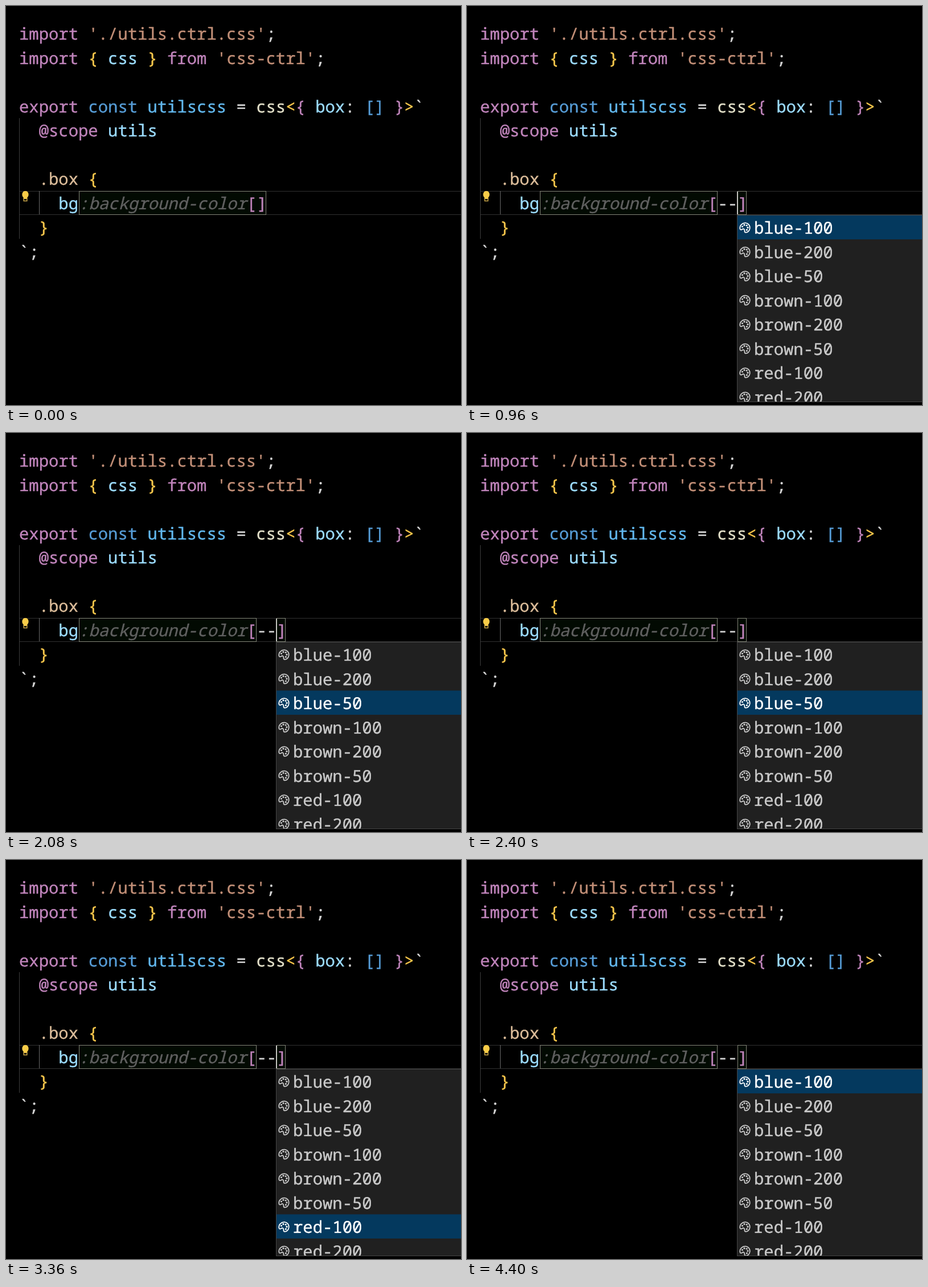
Write an HTML page that moves like this. It is 799 px wide and 701 px high and loops after 4.48 s.

```html
<!DOCTYPE html>
<html lang="en">
<head>
<meta charset="utf-8">
<title>Editor completion</title>
<style>
  html, body { margin: 0; width: 100%; height: 100%; overflow: hidden; background: #000; }
  svg { display: block; width: 799px; height: 701px; }
  text {
    font: 28.9px "Noto Sans Mono", "DejaVu Sans Mono", monospace;
    text-rendering: geometricPrecision;
    white-space: pre;
    fill: currentColor;
    stroke: currentColor;
    stroke-width: .4px;
  }
  .hint { font-style: italic; }
  .item { color: #cacaca; }
  .item.on { color: #fff; }
</style>
</head>
<body>
<svg id="stage" viewBox="0 0 799 701">
  <defs>
    <clipPath id="view"><rect x="475" y="368" width="324" height="327"/></clipPath>
    <g id="palette">
      <path d="M-8.5 2.2C-9.8-4-4.5-8.6 1-8.3C6-8 9.2-3.8 8.7 1C8.3 5.6 4.6 8.6 1.2 8.3C-.9 8-.5 6-.7 4.4C-1 2.1-2.6 1.5-4.2 2.5C-5.8 3.6-7.9 4.4-8.5 2.2Z"
        fill="none" stroke="currentColor" stroke-width="1.8"/>
      <g fill="currentColor">
        <circle cx="-4.5" cy="-2" r="1.6"/><circle cx="-1" cy="-4.8" r="1.6"/>
        <circle cx="3.2" cy="-4" r="1.6"/><circle cx="5" cy="-.2" r="1.6"/>
        <circle cx="3.4" cy="3.8" r="1.6"/>
      </g>
    </g>
  </defs>
  <g id="frame">
    <path d="M24 325.5H799M24 366.5H799" stroke="#303030"/>
    <path d="M23.5 197V409" stroke="#3c3c3c"/>
    <path d="M58.5 325V366" stroke="#686868"/>
    <g id="bulb" transform="translate(0 -1)">
      <path d="M30.6 337.5C26.6 334 28 326 34 326S41.4 334 37.4 337.5V340H30.6Z" fill="#f8cc48"/>
      <path d="M31.2 339V343.6H36.8V339" fill="none" stroke="#c9a649" stroke-width="1.5"/>
    </g>
  </g>
  <g id="boxes" fill="#020a02" stroke="#85857a">
    <rect id="hintBox" x="128.5" y="325.5" height="41"/>
    <rect id="endBox" y="325.5" width="15" height="41"/>
  </g>
  <g id="code"></g>
  <rect id="caret" y="326" width="2" height="40" fill="#c4c4c0"/>
  <g id="menu">
    <rect x="474.5" y="367.5" width="340" height="328" fill="#202020" stroke="#454545"/>
    <g clip-path="url(#view)">
      <g id="list"><rect id="bar" x="475" width="324" height="42.5" fill="#04395e"/></g>
    </g>
  </g>
</svg>
<script>
const LOOP = 4480, LEFT = 23, PITCH = 17.34, ROW = 42.5, BASE = 59;
const MENU_TOP = 367.5, MENU_HEIGHT = 327.5;

const color = {
  key: '#c084bb', str: '#c28f77', gold: '#fac84c', name: '#9cdcfe', kind: '#569cd6',
  def: '#62b8ee', plain: '#d4d4d4', call: '#e2dfc8', sel: '#dcbd9a', hint: '#606060'
};

const lines = {
  0: [['key', 'import '], ['str', "'./utils.ctrl.css'"], ['plain', ';']],
  1: [['key', 'import '], ['gold', '{ '], ['name', 'css '], ['gold', '} '], ['key', 'from '],
      ['str', "'css-ctrl'"], ['plain', ';']],
  3: [['key', 'export '], ['kind', 'const '], ['def', 'utilscss '], ['plain', '= '], ['call', 'css'],
      ['gold', '<'], ['key', '{ '], ['name', 'box'], ['plain', ': '], ['kind', '[] '],
      ['key', '}'], ['gold', '>'], ['plain', '`']],
  4: [['key', '  @scope '], ['name', 'utils']],
  6: [['sel', '  .box '], ['gold', '{']],
  7: [['name', '    bg']],
  8: [['gold', '  }']],
  9: [['plain', '`;']]
};

const items = ['blue', 'brown', 'red'].flatMap(c => [100, 200, 50].map(n => `${c}-${n}`));

// Step tables: [start time, value]
const typed = [[0, ''], [720, '-'], [960, '--']];
const picks = [[0, -1], [960, 0], [1680, 1], [2080, 2], [2480, 3], [2720, 4], [3040, 5],
               [3360, 6], [3600, 7], [3920, 8], [4240, 0]];
const blinks = [[0, 0], [80, 1], [640, 0], [720, 1], [1440, 0], [1920, 1], [2400, 0],
                [2880, 1], [3440, 0], [3920, 1], [4400, 0]];

const $ = id => document.getElementById(id);
const at = (table, t) => table.findLast(step => step[0] <= t)[1];

function add(parent, tag, attrs, content = '') {
  const node = document.createElementNS('http://www.w3.org/2000/svg', tag);
  for (const k in attrs) node.setAttribute(k, attrs[k]);
  node.textContent = content;
  return parent.appendChild(node);
}

function write(x, row, kind, content) {
  return add($('code'), 'text',
    { x, y: BASE + row * ROW, color: color[kind], class: kind }, content);
}

for (const row in lines) {
  let col = 0;
  for (const [kind, token] of lines[row]) {
    const indent = token.length - token.trimStart().length;
    write(LEFT + (col + indent) * PITCH, row, kind, token.trim());
    col += token.length;
  }
}

// The hint sits inside the bracket box and shifts the rest of its line.
const hintX = LEFT + 6 * PITCH + 0.8;
const openX = hintX + 17 * PITCH;
const innerX = 440.5;
write(hintX, 7, 'hint', ':background-color');
write(openX, 7, 'key', '[');
const inner = write(innerX, 7, 'plain', '');
const close = write(innerX, 7, 'key', ']');

const entries = items.map((label, i) => {
  const g = add($('list'), 'g', { class: 'item' });
  const y = MENU_TOP + i * ROW;
  add(g, 'use', { href: '#palette', transform: `translate(488 ${y + 22})` });
  add(g, 'text', { x: 504, y: y + 32.5 }, label);
  return g;
});

function draw(t) {
  const text = at(typed, t), pick = at(picks, t);
  const end = innerX + text.length * PITCH;

  inner.textContent = text;
  close.setAttribute('x', end + 0.5);
  $('hintBox').setAttribute('width', text ? 311 : 328);
  $('endBox').setAttribute('x', Math.floor(end) + 0.5);
  $('endBox').style.display = text ? '' : 'none';
  $('caret').setAttribute('x', Math.round(end) - 1);
  $('caret').style.display = at(blinks, t) ? '' : 'none';

  $('menu').style.display = pick < 0 ? 'none' : '';
  const scroll = Math.max(0, (pick + 1) * ROW - MENU_HEIGHT);
  $('list').setAttribute('transform', `translate(0 ${-scroll})`);
  $('bar').setAttribute('y', MENU_TOP + Math.max(0, pick) * ROW);
  entries.forEach((g, i) => g.classList.toggle('on', i === pick));
}

const start = performance.now();
function tick() {
  draw((performance.now() - start) % LOOP);
  requestAnimationFrame(tick);
}
tick();
</script>
</body>
</html>
```
